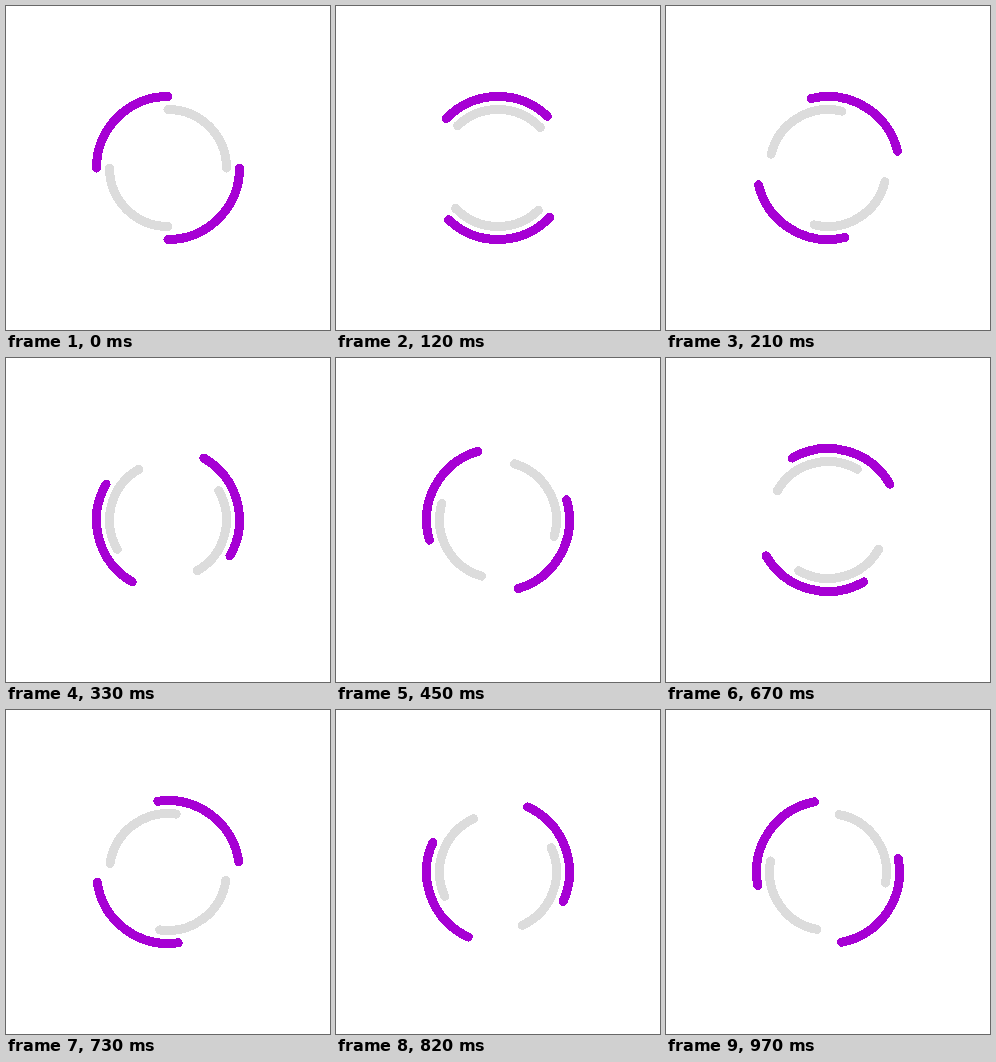
Write an HTML page that moves like this. It is 324 px wide and 324 px high and loops after 1000 ms.

```html
<!DOCTYPE html>
<html>
<head>
<meta charset="utf-8">
<style>
  html, body { margin: 0; width: 100%; height: 100%; overflow: hidden; background: #fff; }
  svg { display: block; width: 100vw; height: 100vh; }
  path { fill: none; stroke-width: 9; stroke-linecap: round; shape-rendering: crispEdges; }
</style>
</head>
<body>
<svg viewBox="-162 -162 324 324">
  <path id="outer" stroke="#a600d4" d="M-71.5 0A71.5 71.5 0 0 1 0 -71.5M71.5 0A71.5 71.5 0 0 1 0 71.5"/>
  <path id="inner" stroke="#dcdcdc" d="M0 -58.5A58.5 58.5 0 0 1 58.5 0M0 58.5A58.5 58.5 0 0 1 -58.5 0"/>
</svg>
<script>
  const STEPS = 33;
  const outer = document.getElementById('outer');
  const inner = document.getElementById('inner');

  // One turn per second in 33 steps, each starting on a 10 ms tick
  function draw() {
    const tick = Math.floor(performance.now() % 1000 / 10);
    const step = Math.floor((tick + 0.5) * STEPS / 100);
    const angle = 360 * step / STEPS;
    outer.setAttribute('transform', `rotate(${angle})`);
    inner.setAttribute('transform', `rotate(${-angle})`);
    requestAnimationFrame(draw);
  }
  draw();
</script>
</body>
</html>
```
